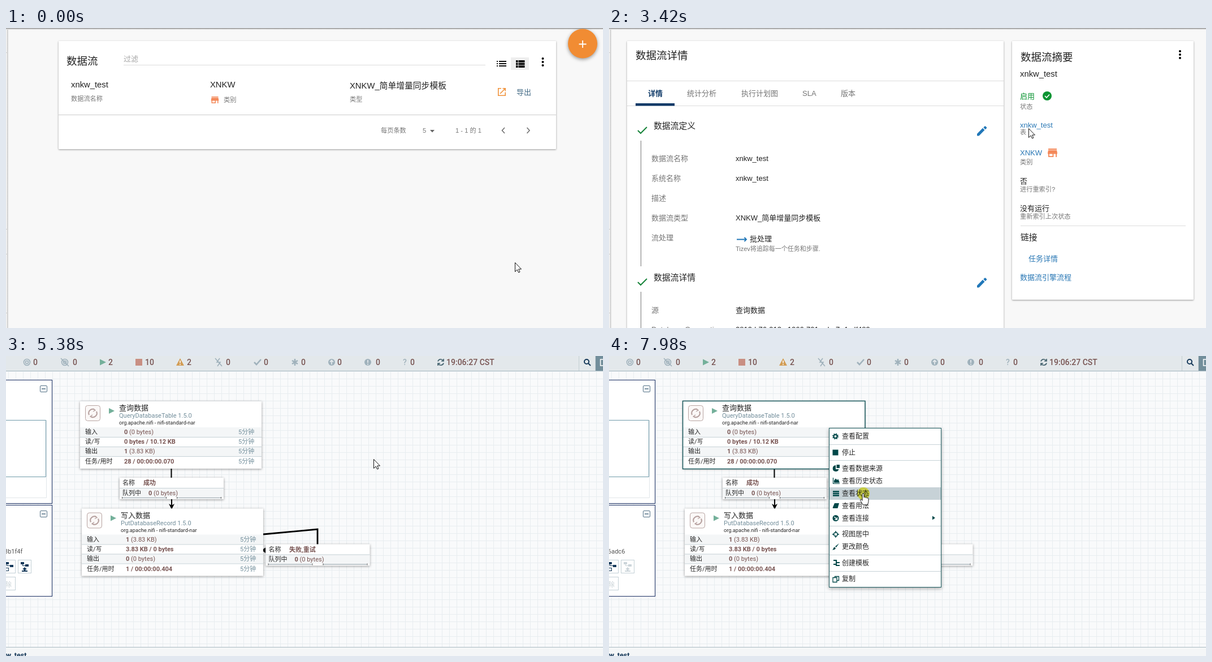
Animation of 1056 by 530 pixels, one loop 8000 ms. Source, as an HTML page:

```html
<!DOCTYPE html>
<html lang="zh-CN">
<head>
<meta charset="utf-8">
<title>数据流</title>
<style>
html,body{margin:0;width:100%;height:100%;overflow:hidden;background:#f8f8f8}
svg{display:block;width:1056px;height:530px}
text{font:13px "Liberation Sans","Noto Sans CJK SC","Noto Sans CJK",sans-serif;fill:#222;white-space:pre}
.h{font-size:18.5px}.m{font-size:14.8px}.s{font-size:11.2px;fill:#777}
.g{fill:#757575}.b{fill:#2a78b5}.ok{fill:#0a9432}
.card{fill:#fff;filter:drop-shadow(0 1px 1.5px #0006)}
.rule{stroke:#dcdcdc}
.ln{fill:none}
/* canvas text; the class also reaches the reused groups in defs */
.nf text{font-family:Roboto,"Noto Sans CJK SC","Noto Sans CJK",sans-serif;font-size:11px;fill:#262626}
.nf .top text{font-size:14px;fill:#775351;font-weight:500}
.nf .v,.nf .v tspan{fill:#775351}
.nf .v{font-weight:700}
.nf .v tspan{font-weight:400}
.nf .t{fill:#728e9b}
.nf .menu text{font-size:12px}
.nf .n{font-size:13px}
.nf .o{font-size:9.2px}
.nf .id{fill:#555}
.box{fill:#fff;filter:drop-shadow(0 1px 2px #0006)}

/* one loop is 8 s, so 1% is 80 ms */
.a{opacity:0;animation:8s step-end infinite}
#app{animation-name:app}
#list{animation-name:list}
#detail{animation-name:detail}
#focus{animation-name:focus}
#splash{animation-name:splash}
#flow{animation-name:flow}
#link{animation-name:link}
#before{animation-name:before}
#after{animation-name:after}
#menu{animation-name:menu}
#hover{animation-name:hover}
#click{animation-name:click;mix-blend-mode:multiply}
#arrow{animation-name:arrow}
#hand{animation-name:hand}
#spin{transform-origin:444.5px 243.5px;animation:spin 8s linear infinite}
#cursor{animation:move 8s linear infinite}
@keyframes app{0%{opacity:1}63.75%{opacity:0}}
@keyframes list{0%{opacity:1}33.25%{opacity:0}}
@keyframes detail{0%{opacity:0}33.25%{opacity:1}63.75%{opacity:0}}
@keyframes focus{0%{opacity:0}22.75%{opacity:1}33.25%{opacity:0}}
@keyframes splash{0%{opacity:0}63.75%{opacity:1}67.25%{opacity:0}}
@keyframes flow{0%{opacity:0}67.25%,100%{opacity:1}}
@keyframes link{0%{opacity:0}77.875%{opacity:1}84.375%{opacity:0}}
@keyframes before{0%{opacity:1}83.25%{opacity:0}}
@keyframes after{0%{opacity:0}83.25%,100%{opacity:1}}
@keyframes menu{0%{opacity:0}84.375%,100%{opacity:1}}
@keyframes hover{
  0%{opacity:0}
  89%{opacity:1;transform:translateY(131px)}
  90.7%{opacity:0}
  91.1%{opacity:1;transform:translateY(160px)}
  92.1%{opacity:1;transform:translateY(187px)}
  93.25%{opacity:1;transform:translateY(209px)}
  94.6%,100%{opacity:1;transform:translateY(232px)}
}
@keyframes click{
  0%{opacity:0}
  18.625%{opacity:1;transform:translate(144px,91px)}
  20.125%{opacity:0}
  62.25%{opacity:1;transform:translate(740px,441px)}
  63.75%{opacity:0}
  82%{opacity:1;transform:translate(389px,129px)}
  83.25%{opacity:0}
  99%,100%{opacity:1;transform:translate(450px,243px)}
}
@keyframes arrow{0%{opacity:1}12.625%{opacity:0}26.5%{opacity:1}58.125%{opacity:0}63.75%{opacity:1}77.5%{opacity:0}}
@keyframes hand{0%{opacity:0}12.625%{opacity:1}26.5%{opacity:0}58.125%{opacity:1}63.75%{opacity:0}77.5%,100%{opacity:1}}
@keyframes spin{0%,63.75%{transform:rotate(9deg)}67.25%,100%{transform:rotate(110deg)}}
@keyframes move{
  0%{transform:translate(900px,414px)}
  2.875%{transform:translate(900px,414px);animation-timing-function:cubic-bezier(.4,.05,.75,.75)}
  12.375%{transform:translate(313px,89px)}
  12.75%{transform:translate(265px,84px);animation-timing-function:ease-out}
  16.5%{transform:translate(144px,91px)}
  22.75%{transform:translate(144px,91px);animation-timing-function:ease-in-out}
  32.75%{transform:translate(672px,201px)}
  33.25%{transform:translate(672px,201px);animation-timing-function:ease-in-out}
  43.125%{transform:translate(742px,177px);animation-timing-function:ease-in-out}
  47.5%{transform:translate(800px,320px);animation-timing-function:ease-in-out}
  53.375%{transform:translate(828px,209px)}
  55.125%{transform:translate(801px,380px);animation-timing-function:ease-out}
  59.75%{transform:translate(740px,441px)}
  63.75%{transform:translate(740px,441px);animation-timing-function:step-end}
  63.76%,76.875%{transform:translate(650px,182px)}
  77.875%{transform:translate(389px,128px)}
  87.875%{transform:translate(389px,128px);animation-timing-function:ease-in-out}
  96.625%,100%{transform:translate(449px,243px)}
}
</style>
</head>
<body>
<svg viewBox="0 0 1056 530">
<defs>
  <linearGradient id="edge" x2="0" y2="1"><stop stop-color="#888"/><stop offset="1" stop-color="#f8f8f8"/></linearGradient>
  <linearGradient id="side"><stop stop-color="#c2c2c2"/><stop offset="1" stop-color="#f8f8f8"/></linearGradient>
  <pattern id="grid" x="4" y="1" width="13" height="13" patternUnits="userSpaceOnUse">
    <path d="M0 .5H13M.5 0V13" stroke="#e8edf0"/>
  </pattern>
  <symbol id="store" viewBox="0 0 18 16">
    <path fill="#f4895a" d="M1 0H17V2H1ZM1 3H17L18 8V10H17V16H15V10H11V16H1V10H0V8ZM3 10V14H9V10Z"/>
  </symbol>
  <path id="pen" fill="#2077b8" d="M0 14V17.5H3.5L13.5 7.3 10 3.8ZM14.6 6.2 17 3.9Q17.6 3.2 17 2.6L14.8.5Q14.2 0 13.6.5L11.3 2.8Z"/>
  <path id="tick" class="ln" stroke="#17843a" stroke-width="2" d="M51 181 56 186 67 175"/>
  <g id="dots"><circle r="2"/><circle cy="6" r="2"/><circle cy="12" r="2"/></g>
  <g id="fold" class="ln" stroke="#527086"><rect x=".5" y=".5" width="12" height="11" rx="1.5"/><path d="M3 6H10" stroke-width="1.5"/></g>
  <g id="proc" class="nf">
    <rect class="box" x="131" y="80" width="321" height="119"/>
    <rect x="140.500" y="87.500" width="26" height="27" rx="4" fill="#fbf8f7" stroke="#b8a5a3"/>
    <g class="ln" stroke="#b59f9d" stroke-width="2"><path d="M147 104A7 7 0 0 1 157 95M160 98A7 7 0 0 1 150 107"/><path d="M154 93 158 96 154 98M153 104 149 107 153 109" stroke-width="1.3"/></g>
    <path d="M182 92 192 97 182 102Z" fill="#74b09a"/>
    <path d="M131 126H452V143H131ZM131 160H452V177H131Z" fill="#f4f6f7"/>
    <path d="M131 143.5H452M131 160.5H452M131 177.5H452" stroke="#c7d2d7"/>
    <text x="140" y="138">输入</text><text x="140" y="155">读/写</text><text x="140" y="172">输出</text><text x="140" y="190">任务/用时</text>
    <text class="t" x="411" y="138">5分钟</text><text class="t" x="411" y="155">5分钟</text><text class="t" x="411" y="172">5分钟</text><text class="t" x="411" y="190">5分钟</text>
    <text class="o" x="200" y="121">org.apache.nifi - nifi-standard-nar</text>
  </g>
  <g id="queue" class="nf">
    <rect class="box" width="184" height="38"/>
    <rect y="18" width="184" height="16" fill="#f4f6f7"/>
    <path d="M0 18.5H184" stroke="#c7d2d7"/>
    <path d="M4 35.5H82M101 35.5H179" stroke="#a8b4ba" stroke-width="1.5"/>
    <path d="M4.5 34V37M82.5 34V37M101.5 34V37M179.5 34V37" stroke="#555"/>
    <text x="5" y="13">名称</text><text x="5" y="30.5">队列中</text><text class="v" x="51" y="30.5">0 <tspan>(0 bytes)</tspan></text>
  </g>
</defs>

<g id="app" class="a">
  <rect width="1056" height="530" fill="#f8f8f8"/>
  <rect width="1.5" height="530" fill="#fff"/>
  <rect x="1.5" width="3.5" height="530" fill="url(#side)"/>
  <rect width="1056" height="3" fill="url(#edge)"/>
  <path d="M0 43.5H2M0 355.5H2M0 399.5H2M0 503.5H2" stroke="#ccc"/>
</g>

<g id="list" class="a">
  <rect class="card" x="93" y="23" width="880" height="191" rx="1"/>
  <text class="h" x="107" y="65">数据流</text>
  <text x="208" y="59" style="fill:#a5a5a5">过滤</text>
  <path class="rule" d="M208 65.5H848"/>
  <path d="M93 153.5H973" stroke="#ccc"/>
  <rect x="893" y="52" width="32" height="22" fill="#eee"/>
  <path d="M868 59H870M868 63H870M868 67H870M872 59H885M872 63H885M872 67H885" stroke="#111" stroke-width="2"/>
  <path d="M902 57H905.5V60.7H902ZM902 61.7H905.5V65.3H902ZM902 66.3H905.5V70H902ZM906.5 57H917.5V60.7H906.5ZM906.5 61.7H917.5V65.3H906.5ZM906.5 66.3H917.5V70H906.5Z"/>
  <use href="#dots" x="949.5" y="54"/>
  <text class="m" x="115" y="105">xnkw_test</text><text class="s" x="115" y="129">数据流名称</text>
  <text class="m" x="361" y="105">XNKW</text><text class="s" x="385" y="131">类别</text>
  <use href="#store" x="362" y="121" width="15" height="12"/>
  <text class="m" x="608" y="107">XNKW_简单增量同步模板</text><text class="s" x="608" y="130">类型</text>
  <path class="ln" stroke="#f0923b" stroke-width="1.6" d="M876 106.8H870.8V119.2H883.2V113.5M878.5 106.8H883.2V111.5M883 107 874 116"/>
  <text x="903" y="118" style="fill:#426a85">导出</text>
  <text class="s" x="663" y="185">每页条数</text><text class="s" x="737" y="185">5</text>
  <path d="M750 180H758L754 184.5Z" fill="#666"/>
  <text class="s" x="795" y="185">1 - 1 的 1</text>
  <path class="ln" stroke="#757575" stroke-width="1.7" d="M882 176 877.5 181 882 186M921.5 176 926 181 921.5 186"/>
  <circle cx="1020" cy="27.5" r="26" fill="#f18c33" style="filter:drop-shadow(0 2px 3px #0006)"/>
  <path d="M1013.5 28.5H1026.5M1020 22V35" stroke="#fff" stroke-width="1.8"/>
</g>
<rect id="focus" class="a ln" x="93.5" y="78.5" width="253" height="74.5" stroke="#7fabee" stroke-width="1.4"/>

<g id="detail" class="a">
  <rect class="card" x="32" y="23" width="666" height="520" rx="1"/>
  <text class="h" x="47" y="55">数据流详情</text>
  <path class="rule" d="M32 93.5H698M32 137.5H698"/>
  <rect x="47" y="133" width="69" height="4.5" fill="#0f3a68"/>
  <text x="69" y="120" style="fill:#0f3a68;font-weight:700">详情</text>
  <text class="g" x="138" y="120">统计分析</text><text class="g" x="234" y="120">执行计划图</text><text class="g" x="342" y="120">SLA</text><text class="g" x="410" y="120">版本</text>
  <use href="#tick"/><use href="#tick" y="268"/>
  <use href="#pen" x="651" y="173"/><use href="#pen" x="651" y="441"/>
  <path d="M56.5 199V421M56.5 466V530" stroke="#777"/>
  <text class="m" x="79" y="178">数据流定义</text><text class="m" x="79" y="446">数据流详情</text>
  <text class="g" x="75" y="235">数据流名称</text><text x="224" y="235">xnkw_test</text>
  <text class="g" x="75" y="270">系统名称</text><text x="224" y="270">xnkw_test</text>
  <text class="g" x="75" y="305">描述</text>
  <text class="g" x="75" y="340">数据流类型</text><text x="224" y="340">XNKW_简单增量同步模板</text>
  <text class="g" x="75" y="375">流处理</text><text x="249" y="377">批处理</text>
  <path class="ln" stroke="#2077b8" stroke-width="1.8" d="M226 373.5H243M239.5 370 243 373.5 239.5 377"/>
  <text class="s" x="224" y="394" style="font-size:11px">Tizev将追踪每一个任务和步骤.</text>
  <text class="g" x="75" y="503">源</text><text x="224" y="503">查询数据</text>
  <text class="g" x="75" y="537">Database Connection</text><text x="224" y="537">0810-b76-912-c1066-701-ada-7c4adf489</text>

  <rect class="card" x="713" y="23" width="321" height="457" rx="1"/>
  <text class="h" x="728" y="58">数据流摘要</text><use href="#dots" x="1010" y="41"/>
  <text class="m" x="727" y="86">xnkw_test</text>
  <text class="ok" x="727" y="125">启用</text><circle class="ok" cx="775" cy="120" r="8"/>
  <path class="ln" stroke="#fff" stroke-width="1.7" d="M771 120 774 123 779 117.5"/>
  <text class="s" x="727" y="143">状态</text>
  <text class="b" x="727" y="176">xnkw_test</text><text class="s" x="727" y="188">表</text>
  <text class="b" x="727" y="225">XNKW</text><use href="#store" x="776" y="213" width="17" height="15"/>
  <text class="s" x="727" y="241">类别</text>
  <text x="727" y="275">否</text><text class="s" x="727" y="289">进行重索引?</text>
  <text x="727" y="323">没有运行</text><text class="s" x="727" y="337">重新索引上次状态</text>
  <path class="rule" d="M728 349.5H1020"/>
  <text class="m" x="728" y="375">链接</text>
  <text class="b" x="742" y="412">任务详情</text><text class="b" x="727" y="445">数据流引擎流程</text>
</g>

<g id="splash" class="a">
  <rect width="1056" height="530" fill="#7198ad"/>
  <circle cx="444" cy="243" r="200" fill="#6d8891"/>
  <circle id="spin" class="ln" cx="444.5" cy="243.5" r="30.5" stroke="#c0564b" stroke-width="6" pathLength="360" stroke-dasharray="110 250"/>
</g>

<g id="flow" class="a nf">
  <rect width="1056" height="530" fill="#f9fafb"/>
  <rect width="1056" height="530" fill="url(#grid)"/>
  <g class="top">
    <rect width="1056" height="26" fill="#e3e8eb"/><path d="M0 26.5H1056" stroke="#aabbc3"/>
    <path d="M1013.5 0V26M1042.5 0V26" stroke="#c3ced3"/>
    <g class="ln" stroke="#a0b2bc" stroke-width="1.6">
      <circle cx="37" cy="11" r="5.5"/><circle cx="37" cy="11" r="2.5"/>
      <circle cx="104" cy="11" r="5.5"/><circle cx="104" cy="11" r="2.5"/><path d="M97 4 111 18M370 4 382 18M378 4 373 11H379L374 18"/>
      <path d="M439 11 443 15 451 6" stroke-width="2.6"/>
      <path d="M511 5V17M506 8 516 14M516 8 506 14" stroke-width="2.6"/>
    </g>
    <g fill="#a0b2bc"><circle cx="576" cy="11" r="6"/><circle cx="640" cy="11" r="6"/></g>
    <path class="ln" stroke="#e3e8eb" stroke-width="1.8" d="M576 15V8M573 10.5 576 7.5 579 10.5M640 7V12M640 13.5V15.5"/>
    <path d="M166 5.5 177 11 166 16.5Z" fill="#74b09a"/><rect x="229" y="5" width="12" height="12" fill="#c98f83"/>
    <path d="M308 4 315 17H301Z" fill="#d29d56"/><path d="M308 8V12.5M308 14V15.7" stroke="#fff" stroke-width="1.6"/>
    <text x="702" y="16" style="fill:#a0b2bc">?</text>
    <text x="48" y="16">0</text><text x="118" y="16">0</text><text x="181" y="16">2</text><text x="246" y="16">10</text><text x="320" y="16">2</text><text x="389" y="16">0</text><text x="456" y="16">0</text><text x="522" y="16">0</text><text x="586" y="16">0</text><text x="654" y="16">0</text><text x="715" y="16">0</text>
    <g class="ln" stroke="#45636f" stroke-width="1.7"><path d="M764 9.5A5 5 0 0 1 773 8M774 12.5A5 5 0 0 1 765 14M774 5V9H770M764 17V13H768"/></g>
    <text x="779" y="16">19:06:27 CST</text>
    <g class="ln" stroke="#16395a" stroke-width="2"><circle cx="1027" cy="10" r="4"/><path d="M1030 13 1034 17"/></g>
    <rect x="1043" width="13" height="26" fill="#728e9b"/><path class="ln" d="M1058 6H1051.5V17H1058" stroke="#fff" stroke-width="1.5"/>
  </g>

  <g stroke="#1c2f63" fill="#fff"><rect x="-5" y="42.5" width="86.5" height="218"/><rect x="-5" y="263.5" width="86.5" height="161"/></g>
  <use href="#fold" x="60" y="52"/><use href="#fold" x="60" y="273"/>
  <path class="ln" stroke="#e1e6e9" d="M0 250.5H71.5V113"/><path class="ln" stroke="#6f9aa9" d="M0 113.5H70.5V213.5H0"/>
  <g class="ln" stroke="#c3d0d6"><rect x="-9.5" y="360.5" width="26" height="23"/><rect x="21.5" y="360.5" width="23" height="23"/><rect x="-9.5" y="390.5" width="26" height="23"/></g>
  <g id="before" class="a">
    <text x="-3" y="349" class="id">3b1f4f</text>
    <path fill="#16395a" d="M26 364H32V368H26ZM34 368H40V372H34ZM29 368H30V370H34V371H29ZM33 373 37 377H34.5V379H38V381H28V379H31.500V377H29Z"/>
  </g>
  <g id="after" class="a">
    <text x="-2" y="349" class="id">6adc6</text>
    <path fill="#ccd5da" d="M26 364H32V368H26ZM34 368H40V372H34ZM29 368H30V370H34V371H29ZM33 373 37 377H34.5V379H38V381H28V379H31.5V377H29Z"/>
  </g>
  <path fill="#16395a" d="M-2 364H5V368H-2ZM7 369H13V373H7ZM1 368H2V370H7V371H1ZM0 374H5V380H0V379H4V375H0Z"/>
  <text x="-1" y="408" style="fill:#c8d1d6">除</text>
  <rect y="515" width="1056" height="15" fill="#f4f6f7"/><path d="M0 514.5H1056" stroke="#aabbc3"/>
  <text x="-20" y="533" style="font-size:12.5px;font-weight:700;fill:#16395a">xnkw_test</text>

  <g class="ln" stroke="#000" stroke-width="2"><path d="M292.5 199V215M293 252V264"/><path d="M455 315 551 306V333" stroke-width="2.8"/></g>
  <path d="M288 261 293 264 298 261 293 271Z"/><path d="M459 338.5V348L452 343Z"/>
  <use href="#proc"/>
  <text class="n" x="200" y="96">查询数据</text><text class="t" x="200" y="109">QueryDatabaseTable 1.5.0</text>
  <text class="v" x="209" y="138">0 <tspan>(0 bytes)</tspan></text><text class="v" x="209" y="155">0 bytes / 10.12 KB</text><text class="v" x="209" y="172">1 <tspan>(3.83 KB)</tspan></text><text class="v" x="209" y="190">28 / 00:00:00.070</text>
  <g transform="translate(3 190)">
    <use href="#proc" y="-.5"/>
    <text class="n" x="200" y="96">写入数据</text><text class="t" x="200" y="109">PutDatabaseRecord 1.5.0</text>
    <text class="v" x="209" y="138">1 <tspan>(3.83 KB)</tspan></text><text class="v" x="209" y="155">3.83 KB / 0 bytes</text><text class="v" x="209" y="172">0 <tspan>(0 bytes)</tspan></text><text class="v" x="209" y="190">1 / 00:00:00.404</text>
  </g>
  <use href="#queue" x="201" y="215"/><text class="v" x="243" y="228">成功</text>
  <use href="#queue" x="459.5" y="332.5"/><text class="v" x="501" y="345.5">失败,重试</text>

  <g id="link" class="a"><circle cx="291.5" cy="143" r="13" fill="#004849"/><path class="ln" stroke="#fff" stroke-width="2" d="M287 138.5 295 146.5M295.5 141V147H289.5"/></g>
  <g id="menu" class="a menu">
    <rect class="ln" x="130.5" y="79.5" width="322.5" height="120" stroke="#1b5a5e" stroke-width="1.5"/>
    <rect x="389.5" y="127.5" width="198" height="281" fill="#fff" stroke="#1b5a5e" style="filter:drop-shadow(0 2px 3px #0005)"/>
    <rect id="hover" class="a" x="390" width="197" height="22" fill="#c7d2d7"/>
    <path d="M390 156.5H587M390 184.5H587M390 300.5H587M390 351.5H587M390 380.5H587" stroke="#c7d2d7"/>
    <g class="ln" stroke="#004849" stroke-width="2">
      <circle cx="400.5" cy="142" r="3"/><circle cx="400.5" cy="142" r="4.5" stroke-dasharray="1.77"/>
      <path d="M396.5 215V225.5H408" stroke-width="1.2"/>
      <path d="M396 239.5H407M396 243H407M396 246.5H407" stroke-width="2.4"/>
      <circle cx="401" cy="315" r="3.5" stroke-width="1.4"/><path d="M401 309V313M401 317V321M395 315H399M403 315H407" stroke-width="1.4"/>
      <path d="M397 361H402V365H408M397 368H402M402 365V370H408"/>
      <path d="M399.5 391V389.5H406.5V396.5H403.5M396 391.5H403V399.5H396Z" stroke-width="1.3"/>
    </g>
    <g fill="#004849">
      <rect x="395.5" y="165.5" width="10" height="10"/>
      <path d="M401 193A5.5 5.5 0 1 0 406.5 200H401ZM402.5 192H408V198H402.5Z"/>
      <path d="M398 224V220L401 216.5 403.5 219 405.5 217.5 408 224Z"/>
      <path d="M399 260H407L404.5 269H397Q395 269 396 267Z"/>
      <circle cx="401" cy="286.5" r="5.5"/>
      <path d="M407 331 402 338 400 336.5ZM399 337.5 401 339.5Q400 343 395 342.5Q397 341 397 339.5Q397.5 338 399 337.5Z"/>
      <path d="M572 282.5 577 286 572 289.5Z"/>
    </g>
    <path class="ln" stroke="#fff" stroke-width="1.4" d="M398.5 284 403 288.5M403.5 285V289H399.5"/>
    <text x="412" y="146">查看配置</text><text x="412" y="175">停止</text><text x="412" y="203">查看数据来源</text><text x="412" y="225">查看历史状态</text><text x="412" y="247">查看状态</text><text x="412" y="269">查看用法</text><text x="412" y="291">查看连接</text><text x="412" y="319">视图居中</text><text x="412" y="341">更改颜色</text><text x="412" y="370">创建模板</text><text x="412" y="398">复制</text>
  </g>
</g>

<circle id="click" class="a" r="11" fill="#fbf650"/>
<g id="cursor" fill="#fff" stroke="#111">
  <path id="arrow" class="a" d="M.5.5V16.5L4.2 13 6.7 18 9 17 6.7 12H11.5Z"/>
  <path id="hand" class="a" d="M-1 11.5V1a1.5 1.5 0 0 1 3 0V7a1.5 1.5 0 0 1 2.8.5a1.5 1.5 0 0 1 2.7.7a1.4 1.4 0 0 1 2.5 1V13.5c0 3-1.5 4-1.5 6.5H0c0-2-4-5.500-4.5-8.500c-.3-1.800 2.200-1.500 3.500.8z"/>
</g>
</svg>
</body>
</html>
```
